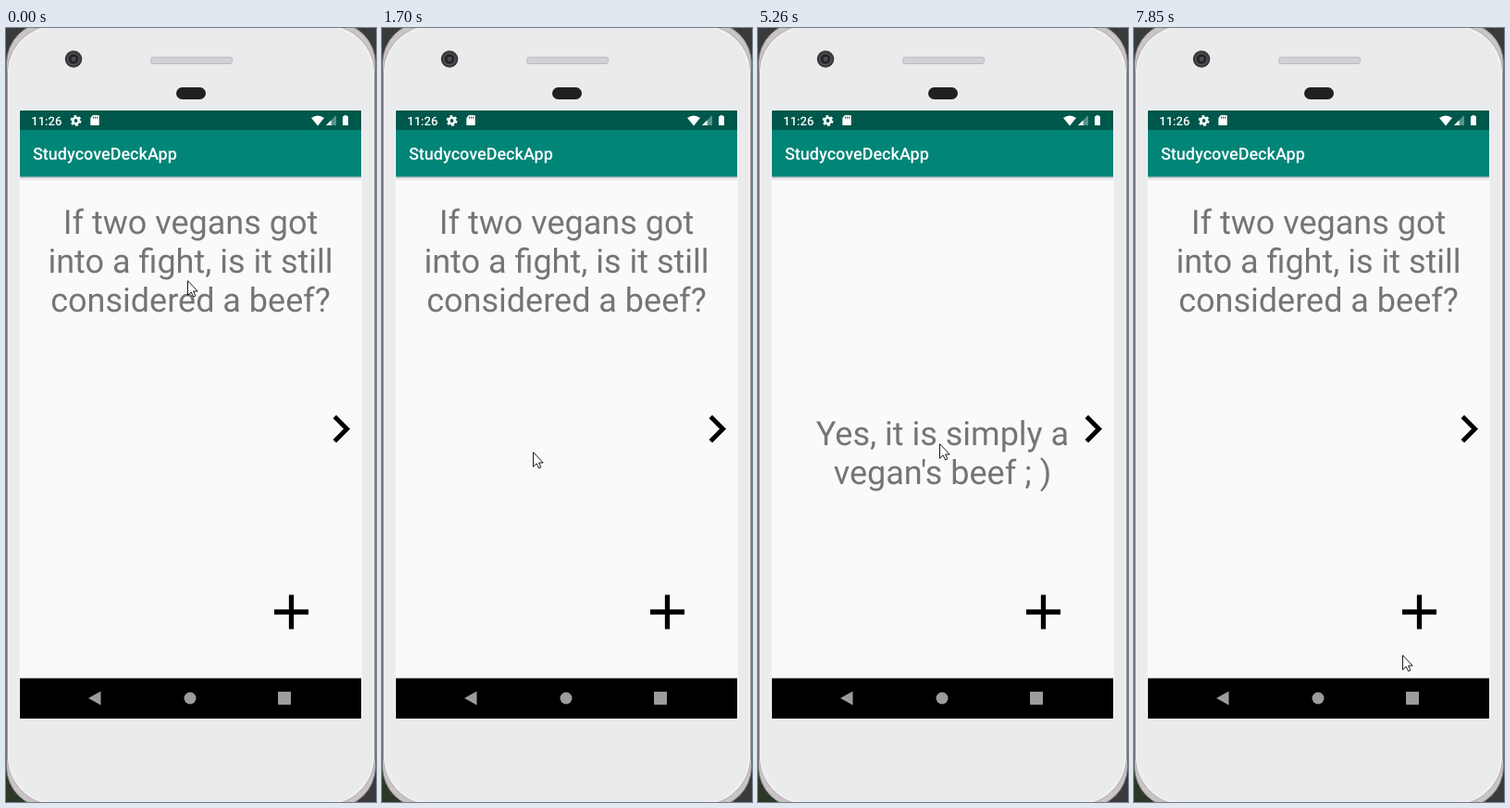
Recreate the animation shown at these times as an HTML page. Size 400 by 835 pixels, loop 8 s.

```html
<!DOCTYPE html>
<html lang="en">
<head>
<meta charset="utf-8">
<title>Flashcards</title>
<style>
  html, body { margin: 0; width: 100%; height: 100%; overflow: hidden; background: #383a3b; }
  svg { display: block; width: 400px; height: 835px; }
  text { font-family: Roboto, "Noto Sans", sans-serif; text-rendering: geometricPrecision; }
  .card { font-size: 36px; fill: #757575; text-anchor: middle; }
  .bar { fill: #fff; font-weight: 500; }
</style>
</head>
<body>
<svg viewBox="0 0 400 835">
  <defs>
    <linearGradient id="shade" x2="0" y2="1">
      <stop offset="0" stop-color="#000" stop-opacity=".26"/>
      <stop offset=".4" stop-color="#000" stop-opacity=".08"/>
      <stop offset="1" stop-color="#000" stop-opacity="0"/>
    </linearGradient>
  </defs>

  <!-- phone body -->
  <rect width="400" height="835" fill="#383a3b"/>
  <rect y="800" width="30" height="35" fill="#2b3827"/>
  <rect x=".5" y="-6" width="399" height="847" rx="44" fill="#c9c4c6" stroke="#777376"/>
  <rect x="1.500" y="-3" width="397" height="841" rx="52" fill="#e9ebed" stroke="#a39da0"/>
  <rect x="3" y="-1.500" width="394" height="838" rx="50.500" fill="none" stroke="#f3eef0" stroke-width="2"/>
  <circle cx="73" cy="33.500" r="9.300" fill="#3b3c3e"/>
  <circle cx="73" cy="33.500" r="6" fill="#232426" stroke="#626466"/>
  <circle cx="73" cy="33.500" r="2.500" fill="#4b4e52"/>
  <rect x="156.500" y="31.500" width="88" height="7" rx="2" fill="#d0d2d5" stroke="#bcbec1"/>
  <rect x="184" y="64" width="32" height="13" rx="6.500" fill="#1f2022"/>
  <rect x="14" y="88" width="371" height="658" fill="#f1f2f3"/>

  <!-- app -->
  <rect x="15" y="89" width="369" height="613" fill="#fafafa"/>
  <rect x="15" y="89" width="369" height="21" fill="#00574b"/>
  <rect x="15" y="110" width="369" height="50.500" fill="#008577"/>
  <rect x="15" y="160.500" width="369" height="5" fill="url(#shade)"/>
  <text class="bar" x="27.300" y="104.500" font-size="13">11:26</text>
  <text class="bar" x="29" y="142" font-size="18">StudycoveDeckApp</text>

  <g fill="none" stroke="#fff">
    <circle cx="75.500" cy="100" r="3.200" stroke-width="2.600"/>
    <circle cx="75.500" cy="100" r="5" stroke-width="2" stroke-dasharray="2.600 2.636"/>
  </g>
  <path d="M94 94h6q.7 0 .7.7v9.600q0 .7-.7.7h-8q-.7 0-.7-.7V97z" fill="#fff"/>
  <path d="M94.400 95.500v2.200M96.500 95.500v2.200M98.600 95.500v2.200" stroke="#00574b"/>
  <path d="M330 97q7-5 14 0l-7 8.500z" fill="#fff"/>
  <path d="M357 94v11h-11z" fill="#fff" opacity=".35"/>
  <path d="M351.500 99.500V105H346z" fill="#fff"/>
  <path d="M364 95.200h1.600V94h2.800v1.200h1.600V105h-6z" fill="#fff"/>

  <g id="question" class="card">
    <text x="199.500" y="222">If two vegans got</text>
    <text x="199.500" y="264">into a fight, is it still</text>
    <text x="199.500" y="306">considered a beef?</text>
  </g>
  <g id="answer" class="card" opacity="0">
    <text x="199.500" y="450">Yes, it is simply a</text>
    <text x="199.500" y="492">vegan's beef ; )</text>
  </g>

  <path d="M357 417.500l15 15-15 15-3.500-3.500L365 432.500 353.500 421z"/>
  <path d="M290 630h37M308.500 611.500v37" stroke="#000" stroke-width="5.300"/>

  <rect x="15" y="701.500" width="369" height="43.500" fill="#000"/>
  <g fill="#9c9c9c">
    <path d="M89 723l13.500-7.500v15z"/>
    <circle cx="199" cy="723" r="6.500"/>
    <rect x="294" y="716" width="14" height="14"/>
  </g>

  <g id="cursor">
    <path d="M.5.7v15.600l3.600-3.400 2.500 5 2.300-1-2.400-4.900h4.700z" fill="#fff" stroke="#000" stroke-width=".9"/>
  </g>
</svg>
<script>
const LOOP = 8000;

const out = k => p => 1 - (1 - p) ** k;
const power = k => p => p ** k;
const smooth = p => p * p * (3 - 2 * p);

// The pointer rests between swipes; each swipe is sampled in even steps.
const home = [196, 272];
const swipes = [
  { start: 720, end: 1270, steps: 5, to: [163, 457], ease: [out(5), out(2)] },
  { start: 2440, end: 3130, steps: 6, to: [211, 298], ease: [smooth, smooth] },
  { start: 4450, end: 5260, steps: 7, to: [196, 448], ease: [out(1.5), out(1.4)] },
  { start: 7460, end: 7850, steps: 4, to: [290, 676], ease: [power(1.9), power(1.1)] }
];
const flipTimes = [290, 1700, 4010, 5850];

const key = (time, style) => ({ offset: time / LOOP, easing: "step-end", ...style });
const place = ([x, y]) => ({ transform: `translate(${x}px, ${y}px)` });

function pointerKeys() {
  const keys = [key(0, place(home))];
  let from = home;
  for (const { start, end, steps, to, ease } of swipes) {
    for (let i = 1; i <= steps; i++) {
      const time = start + (end - start) * (i - 1) / (steps - 1);
      const at = from.map((v, axis) =>
        Math.round(v + (to[axis] - v) * ease[axis](i / steps)));
      keys.push(key(time, place(at)));
    }
    from = to;
  }
  return keys;
}

// Visibility of one card side, toggled at every flip.
const sideKeys = first =>
  [0, ...flipTimes].map((time, i) => key(time, { opacity: (i + first) % 2 }));

function play(id, keys) {
  const last = { ...keys[keys.length - 1], offset: 1 };
  document.getElementById(id)
    .animate([...keys, last], { duration: LOOP, iterations: Infinity });
}

play("cursor", pointerKeys());
play("question", sideKeys(1));
play("answer", sideKeys(0));
</script>
</body>
</html>
```
